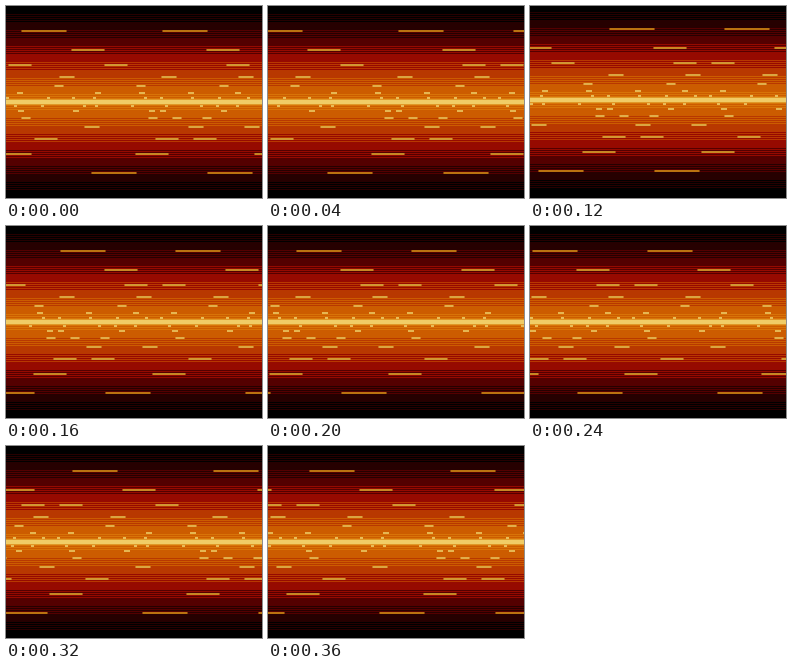
Recreate the animation shown at these times as an HTML page. Size 256 by 192 pixels, loop 0.4 s.

```html
<!DOCTYPE html>
<html lang="en">
<head>
<meta charset="utf-8">
<title>Streaks</title>
<style>
html, body { margin: 0; width: 100%; height: 100%; overflow: hidden; background: #000; }
svg { display: block; width: 100vw; height: 100vh; }
</style>
</head>
<body>
<svg viewBox="0 0 256 192" preserveAspectRatio="none" shape-rendering="crispEdges">
  <g id="scene">
    <g id="sky"></g>
    <g id="streaks"></g>
  </g>
</svg>
<script>
const W = 256, H = 192, MID = 96, STEP = 40, STEPS = 10;
const [scene, sky, streaks] = ['scene', 'sky', 'streaks'].map(id => document.getElementById(id));

const bands = ['#000', '#260000', '#540000', '#960a00', '#b83800', '#cc5c00', '#d87408'];
const weave = [0.15, 0.65, 0.4, 0.85];

// streak starts above and below the horizon, from near rows to the outermost
const above = ['48 130 213', '53 155 232', '2 98 220', '65 200', '15 156'];
const below = ['15 142 166 196', '78 182 238', '28 149 187', '129 248', '85 201'];

let seed = 11;
function random() {
  seed = (seed * 16807) % 2147483647;
  return seed / 2147483647;
}

function rect(parent, x, y, w, h, fill, opacity = 1) {
  const r = document.createElementNS('http://www.w3.org/2000/svg', 'rect');
  Object.entries({ x, y, width: w, height: h, fill, opacity })
    .forEach(([k, v]) => r.setAttribute(k, v));
  parent.appendChild(r);
}

// neighbouring bands are interlaced line by line
function skyColor(d) {
  if (d < 2) return '#f0cc66';
  if (d < 3) return '#e09828';
  const level = (92 - d) / 16 + weave[Math.floor(d) % 4];
  return bands[Math.max(0, Math.floor(level))];
}

function scatter(n) {
  return Array.from({ length: n }, (_, i) => Math.round((i + random()) * W / n));
}

function drawRow(y, d, starts) {
  const len = Math.round(d * 0.65);
  const far = d / 71;
  const color = `rgb(${[236 - 50 * far, 192 - 78 * far, 92 - 76 * far].map(Math.round)})`;
  const cap = len > 8 ? 1 : 0;
  for (const s of starts) {
    for (const x of [s - W, s, s + W]) {
      rect(streaks, x, y, len, 2, color, cap ? 0.55 : 1);
      if (cap) rect(streaks, x + cap, y, len - 2 * cap, 2, color);
    }
  }
}

for (let y = 0; y < H; y++) {
  rect(sky, 0, y, W, 1, skyColor(Math.abs(y + 0.5 - MID)));
}

// rows spread out from the horizon in perspective
for (let k = 0; k < 7; k++) {
  const d = Math.round(4 + 17.6 * (1.3 ** k - 1));
  const starts = rows => k < 2 ? scatter(9 - 4 * k) : rows[k - 2].split(' ').map(Number);
  drawRow(MID - d - 1, d, starts(above));
  drawRow(MID + d - 1, d, starts(below));
}

function draw(t) {
  const step = Math.floor(t / STEP) % STEPS;
  const bump = step % 4 === 3 ? -2 : 0;
  scene.setAttribute('transform', `translate(0 ${bump})`);
  streaks.setAttribute('transform', `translate(${-Math.round(step * W / STEPS)} 0)`);
}

const begin = performance.now();
function tick() {
  draw(performance.now() - begin);
  requestAnimationFrame(tick);
}
draw(0);
requestAnimationFrame(tick);
</script>
</body>
</html>
```
